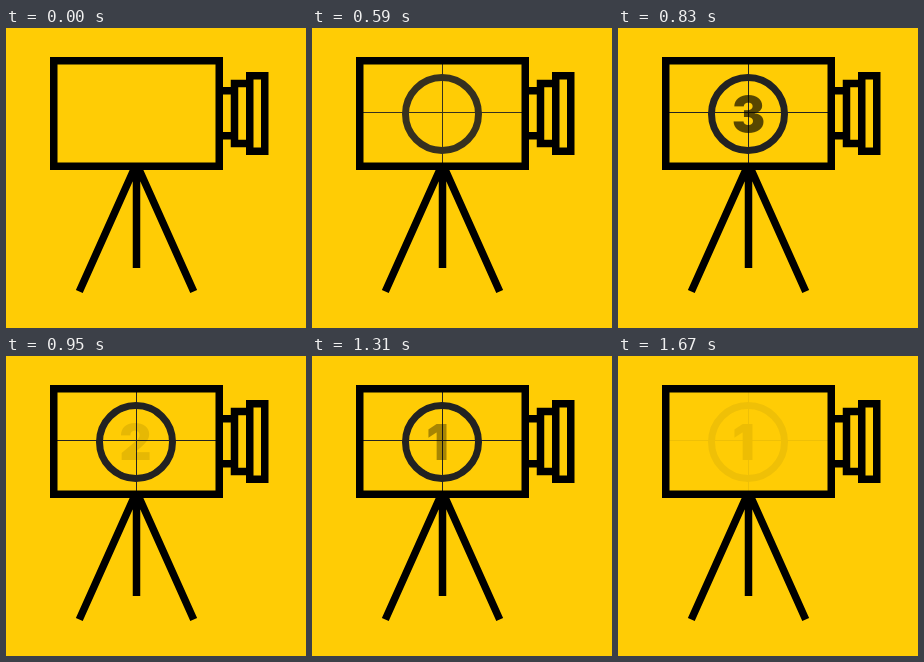
Recreate the animation shown at these times as an HTML page. Size 300 px wide and 300 px high, loop 1.73 s.

```html
<!DOCTYPE html>
<html lang="en">
<head>
<meta charset="utf-8">
<title>Camera countdown</title>
<style>
  html, body { margin: 0; width: 100%; height: 100%; overflow: hidden; background: #ffcc05; }
  svg { display: block; width: 100%; height: 100%; }
  text { font: 900 50px Inter, "Liberation Sans", sans-serif; text-anchor: middle; }
</style>
</head>
<body>
<svg viewBox="0 0 300 300">
  <rect width="300" height="300" fill="#ffcc05"/>
  <g id="screen">
    <g fill="none" stroke="#222">
      <path d="M51 84.5H211M130.5 36V135"/>
      <circle cx="130" cy="86" r="36.5" stroke-width="7"/>
    </g>
    <text id="three" x="130.5" y="104">3</text>
    <text id="two" x="129.5" y="104">2</text>
    <text id="one" x="125.5" y="104">1</text>
  </g>
  <g fill="none" stroke="#000" stroke-width="7.5">
    <rect x="47.75" y="32.75" width="165.5" height="105.5"/>
    <path d="M217 62.75H228M217 107.75H228"/>
    <path d="M243 55.5H228.5V115.5H243"/>
    <rect x="243.75" y="47.75" width="15" height="75.5"/>
    <path d="M130.5 138V240M129.5 138L73.3 263.5M131.5 138L187.7 263.5"/>
  </g>
</svg>
<script>
  const LOOP = 1730, STEP = 30, FIRST = 500, LAST = 1670, FADE = 150;
  const [screen, three, two, one] =
    ["screen", "three", "two", "one"].map(id => document.getElementById(id));

  // Sine ease from 0 to 1, starting at the given time
  function ease(t, start, length = FADE) {
    const p = Math.min(1, Math.max(0, (t - start) / length));
    return (1 - Math.cos(Math.PI * p)) / 2;
  }

  const pulse = (t, start) => ease(t, start) - ease(t, start + FADE);

  function show(el, opacity) {
    el.setAttribute("opacity", opacity.toFixed(3));
  }

  function render(time) {
    const stepped = FIRST + Math.floor((time - FIRST) / STEP) * STEP;
    const t = Math.min(LAST, stepped);
    show(screen, ease(t, 470) - ease(t, 1520, 180));
    show(three, pulse(t, 620));
    show(two, pulse(t, 920));
    show(one, ease(t, 1250));
  }

  const origin = performance.now();
  function tick() {
    render((performance.now() - origin) % LOOP);
    requestAnimationFrame(tick);
  }
  tick();
</script>
</body>
</html>
```
